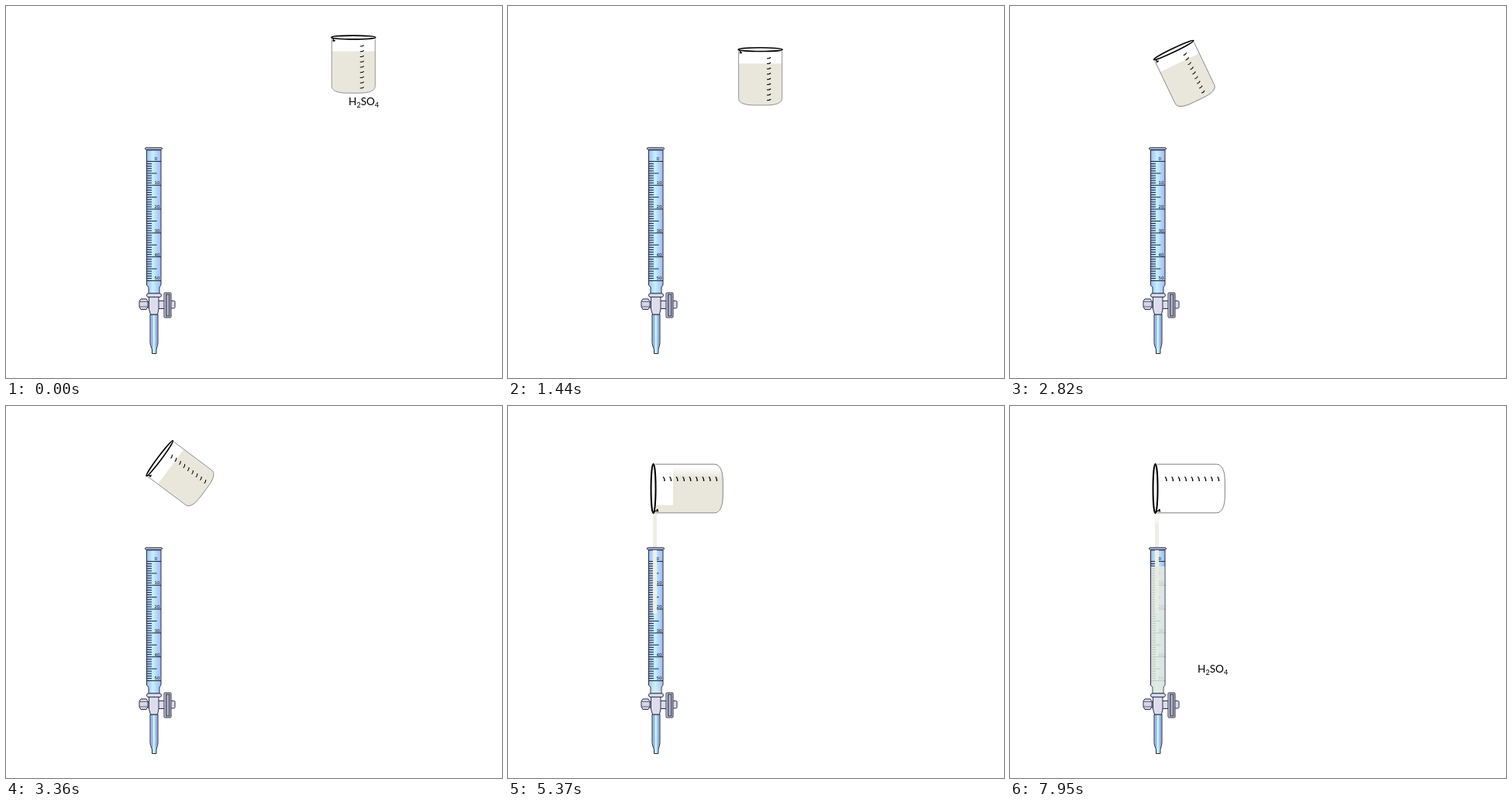
Write an HTML page that moves like this. It is 640x480 px and loops after 8000 ms.

```html
<!DOCTYPE html>
<html lang="en">
<head>
<meta charset="utf-8">
<title>Filling a burette</title>
<style>
html, body { margin: 0; width: 100%; height: 100%; overflow: hidden; background: #fff; }
svg { display: block; width: 100vw; height: 100vh; }
.label { font: 13.6px Lato, "Open Sans", sans-serif; }
.sub { font-size: 9px; }
.scale { font: 5.6px "DejaVu Sans", sans-serif; fill: #10131f; }
.metal { stroke: #2a2c40; }
</style>
</head>
<body>
<svg viewBox="0 0 640 480">
  <defs>
    <linearGradient id="glass">
      <stop offset="0" stop-color="#a3b4ee"/>
      <stop offset=".2" stop-color="#b0d4f8"/>
      <stop offset=".45" stop-color="#c6f0fc"/>
      <stop offset=".65" stop-color="#b4dcfa"/>
      <stop offset="1" stop-color="#a3b9f2"/>
    </linearGradient>
    <linearGradient id="drain" gradientUnits="userSpaceOnUse" x1="0" x2="0">
      <stop offset="0" stop-color="#e9e7dc" stop-opacity="0"/>
      <stop offset="1" stop-color="#e9e7dc"/>
    </linearGradient>
    <linearGradient id="rise" gradientUnits="userSpaceOnUse" x1="0" x2="0">
      <stop offset="0" stop-color="#e6ebdf" stop-opacity="0"/>
      <stop offset="1" stop-color="#e6ebdf" stop-opacity=".82"/>
    </linearGradient>
    <linearGradient id="pour" gradientUnits="userSpaceOnUse" x1="0" x2="0">
      <stop offset="0" stop-color="#efeee6" stop-opacity="0"/>
      <stop offset="1" stop-color="#efeee6"/>
    </linearGradient>
    <g id="beaker" fill="none" stroke="#000">
      <path d="M-28-33V28C-28 34-20 36.800-8 36.800H8C20 36.800 28 34 28 28V-33" stroke="#777" stroke-width=".8"/>
      <ellipse cy="-35" rx="28.500" ry="2.400" stroke-width="1.600"/>
      <path d="M-28-34.500Q-25-34-26-30.500L-23.500-31" stroke-width="1.400"/>
      <path id="marks" stroke-width="1.100"/>
    </g>
  </defs>

  <g class="metal">
    <path d="M186 398H196V434Q196 438 194 443V448.500H188.500V443Q186 438 186 434Z" fill="url(#glass)"/>
    <path d="M188.500 399V442M193.800 399V442" stroke="#6d83b8" stroke-width=".7"/>
    <path d="M181.500 186V360L184 363V371H198V363L200 360V186Z" fill="url(#glass)"/>
  </g>
  <path id="ticks" fill="none" stroke="#10131f" stroke-width=".9"/>
  <g id="numbers"></g>
  <rect id="stream" x="187" width="5" fill="url(#pour)"/>
  <path d="M182 207H199.500V360L197.500 363V370H184.500V363L182 360Z" fill="url(#rise)"/>
  <g class="metal">
    <rect x="179.500" y="182.800" width="22" height="2.500" rx="1.200" fill="#b9cbf2"/>
    <rect x="196" y="380.500" width="9" height="10" fill="#dcdcee"/>
    <rect x="182" y="382" width="4" height="7" fill="#dcdcee"/>
    <path d="M184.500 375H197V391L195.500 398H186.500L184.500 391Z" fill="#dcdcee"/>
    <rect x="181.500" y="370.800" width="19" height="4.800" rx="2.400" fill="#d3dcf2"/>
    <path d="M174 378H181L183 381V388L181 391.500H174L172 388V381Z" fill="#d5d6ea"/>
    <path d="M172.500 381.500H182.500M172.500 388H182.500" stroke-width=".7"/>
    <rect x="212" y="380.500" width="6" height="9.500" rx="1.500" fill="#dcdcee"/>
    <rect x="204" y="370" width="9" height="32" rx="1" fill="#d9dbee"/>
    <rect x="206.500" y="372" width="4.500" height="28" fill="#a4a8bc"/>
  </g>

  <g id="small">
    <path d="M-27.500-17V28C-27.500 34-20 36.500-8 36.500H8C20 36.500 27.500 34 27.500 28V-17Z" fill="#e9e7dc"/>
    <use href="#beaker"/>
  </g>
  <g id="large">
    <path d="M213 76H266C274 76 277 85 277 98V115C277 128 274 137 266 137H191V128H213Z" fill="url(#drain)"/>
    <use href="#beaker" transform="translate(231.300 106.500) rotate(-90) scale(1.12 1.25)"/>
  </g>
  <text id="before" class="label" x="442" y="127.500">H<tspan class="sub" dy="3">2</tspan><tspan dy="-3">SO</tspan><tspan class="sub" dy="3">4</tspan></text>
  <text id="after" class="label" x="242" y="343.800">H<tspan class="sub" dy="3">2</tspan><tspan dy="-3">SO</tspan><tspan class="sub" dy="3">4</tspan></text>
</svg>
<script>
const LOOP = 8000, STEP = 60;
const el = id => document.getElementById(id);
const set = (id, attrs) => {
  for (const k in attrs) el(id).setAttribute(k, attrs[k]);
};
const part = (t, from, to) => Math.min(1, Math.max(0, (t - from) / (to - from)));
const smooth = u => u * u * (3 - 2 * u);
const edge = (id, clear, solid) => set(id, { y1: clear, y2: solid });

function buildScales() {
  let marks = "", ticks = "", numbers = "";
  for (let i = 0; i < 9; i++) marks += `M8.500 ${-23.5 + i * 6.75}q3 .4 5-1.400`;
  for (let i = 0; i <= 50; i++) {
    const y = 200.5 + i * 3.08;
    const end = i % 10 === 0 ? 200 : i % 5 === 0 ? 194.5 : 188;
    ticks += `M182 ${y}H${end}`;
    if (i % 10 === 0) numbers += `<text class="scale" x="191.500" y="${y - 1.2}">${i}</text>`;
  }
  set("marks", { d: marks });
  set("ticks", { d: ticks });
  el("numbers").innerHTML = numbers;
}

function draw(t) {
  // The beaker sinks, glides left, then tips over.
  const s = smooth(part(t, 520, 2180));
  const way = s * 237;
  const x = 448.3 - Math.max(0, way - 15);
  const y = 75.5 + Math.min(16, way) - 3 * s ** 4;
  const tilt = -90 * part(t, 2320, 4080);
  set("small", {
    transform: `translate(${x} ${y}) rotate(${tilt})`,
    opacity: 1 - part(t, 4080, 4500)
  });
  set("large", { visibility: t >= 4080 ? "visible" : "hidden" });

  // Soft-edged levels: beaker empties while the burette fills.
  const low = 87 + (t - 5640) * 0.0262;
  edge("drain", low, low + 12);
  const high = 357 - (t - 5640) * 0.0774;
  edge("rise", high - 25, high);

  const top = 138 + 127 * part(t, 7860, 8360);
  set("stream", { y: 138, height: 130 * part(t, 4800, 5300) });
  edge("pour", t < 7860 ? 130 : top - 10, t < 7860 ? 138 : top);

  set("before", { opacity: 1 - part(t, 0, 500) });
  set("after", { opacity: part(t, 7560, 7860) });
}

const start = performance.now();
function tick() {
  const t = (performance.now() - start) % LOOP;
  draw(Math.floor(t / STEP) * STEP);
  requestAnimationFrame(tick);
}
buildScales();
draw(0);
requestAnimationFrame(tick);
</script>
</body>
</html>
```
